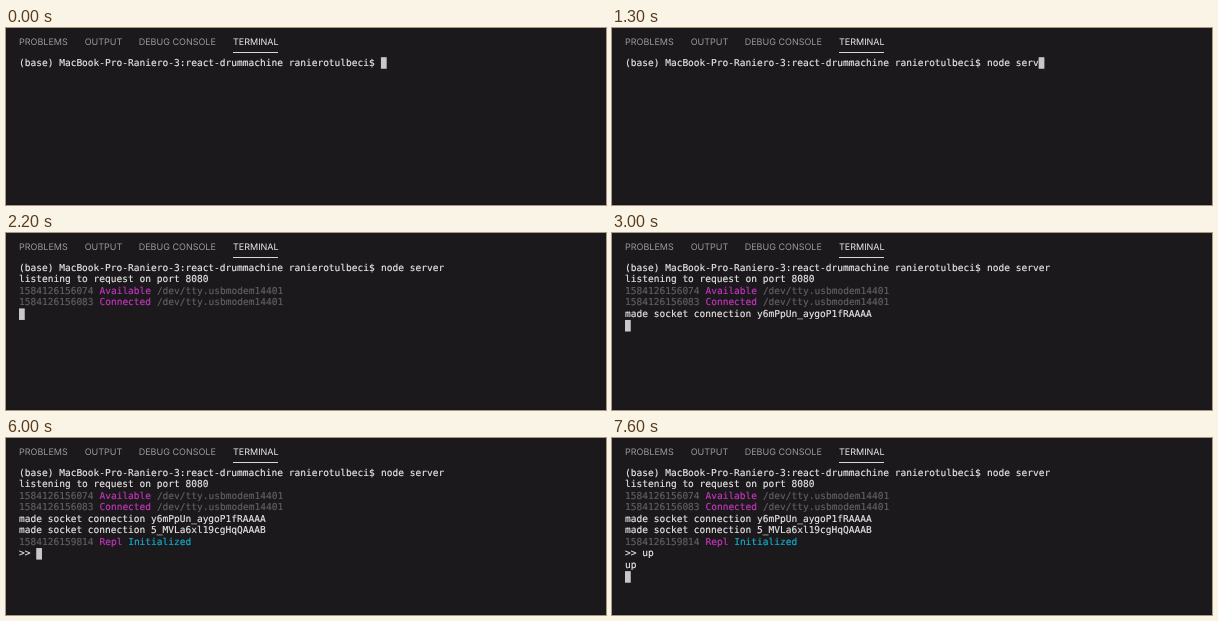
An HTML page that plays this animation: 600x177 px, repeating every 8 s.

```html
<!DOCTYPE html>
<html lang="en">
<head>
<meta charset="utf-8">
<title>Terminal</title>
<style>
  html, body { margin: 0; width: 100%; height: 100%; overflow: hidden; background: #1b191b; }
  svg { display: block; width: 600px; height: 177px; }
  text { white-space: pre; text-rendering: geometricPrecision; fill: currentColor; }
  .tabs text { font: 9px Inter, "Liberation Sans", sans-serif; color: #9a999a; }
  .tabs .active { color: #ececec; }
  #screen text {
    font: 9.54px "DejaVu Sans Mono", "Liberation Mono", monospace;
    stroke: currentColor;
    stroke-width: .15px;
  }
  .plain { color: #e9e8e9; }
  .dim { color: #626062; }
  .pink { color: #c435bd; }
  .cyan { color: #12b0d3; }
</style>
</head>
<body>
<svg viewBox="0 0 600 177">
  <rect width="600" height="177" fill="#1b191b"/>
  <rect y="176" width="600" height="1" fill="#161416"/>
  <g class="tabs">
    <text x="13" y="17">PROBLEMS</text>
    <text x="78.7" y="17">OUTPUT</text>
    <text x="132.7" y="17">DEBUG CONSOLE</text>
    <text x="227" y="17" class="active">TERMINAL</text>
    <rect x="227" y="24" width="45" height="1" fill="#d8d8d8"/>
  </g>
  <g id="screen"></g>
  <rect id="cursor" width="5.75" height="11.55" fill="#c9c8c9"/>
</svg>
<script>
  const LOOP = 8000;
  const LEFT = 13, TOP = 29.2, CELL = 5.745, LINE = 11.55, BASE = 8.4;
  const screen = document.getElementById('screen');
  const cursor = document.getElementById('cursor');

  const plain = text => [text, 'plain'];
  const dim = text => [text, 'dim'];
  const pink = text => [text, 'pink'];
  const cyan = text => [text, 'cyan'];
  const device = dim('/dev/tty.usbmodem14401\n');

  // Each step appends its runs to the terminal at the given time.
  const steps = [
    [0, plain('(base) MacBook-Pro-Raniero-3:react-drummachine ranierotulbeci$ ')],
    [200, plain('n')],
    [300, plain('o')],
    [400, plain('d')],
    [500, plain('e')],
    [700, plain(' ')],
    [900, plain('se')],
    [1100, plain('r')],
    [1300, plain('v')],
    [1400, plain('e')],
    [1500, plain('r')],
    [1900, plain('\n')],
    [2200, plain('listening to request on port 8080\n'),
      dim('1584126156074 '), pink('Available '), device,
      dim('1584126156083 '), pink('Connected '), device],
    [2700, plain('made socket connection y6mPpUn_aygoP1fRAAAA\n')],
    [4800, plain('made socket connection 5_MVLa6xl19cgHqQAAAB\n')],
    [6000, dim('1584126159814 '), pink('Repl '), cyan('Initialized\n'), plain('>> ')],
    [7100, plain('up\n')],
    [7600, plain('up\n')]
  ];

  function addRun(text, style, row, col) {
    const node = document.createElementNS('http://www.w3.org/2000/svg', 'text');
    node.setAttribute('x', LEFT + col * CELL);
    node.setAttribute('y', TOP + row * LINE + BASE);
    node.setAttribute('class', style);
    node.textContent = text;
    screen.append(node);
  }

  function render(count) {
    let row = 0, col = 0;
    screen.replaceChildren();
    for (const [, ...runs] of steps.slice(0, count)) {
      for (const [text, style] of runs) {
        text.split('\n').forEach((part, i) => {
          if (i) { row++; col = 0; }
          if (part) addRun(part, style, row, col);
          col += part.length;
        });
      }
    }
    cursor.setAttribute('x', LEFT + col * CELL);
    cursor.setAttribute('y', TOP + row * LINE);
  }

  const start = performance.now();
  let shown = 0;

  function tick() {
    const time = (performance.now() - start) % LOOP;
    const count = steps.filter(([at]) => at <= time).length;
    if (count !== shown) render(shown = count);
    requestAnimationFrame(tick);
  }
  tick();
</script>
</body>
</html>
```
